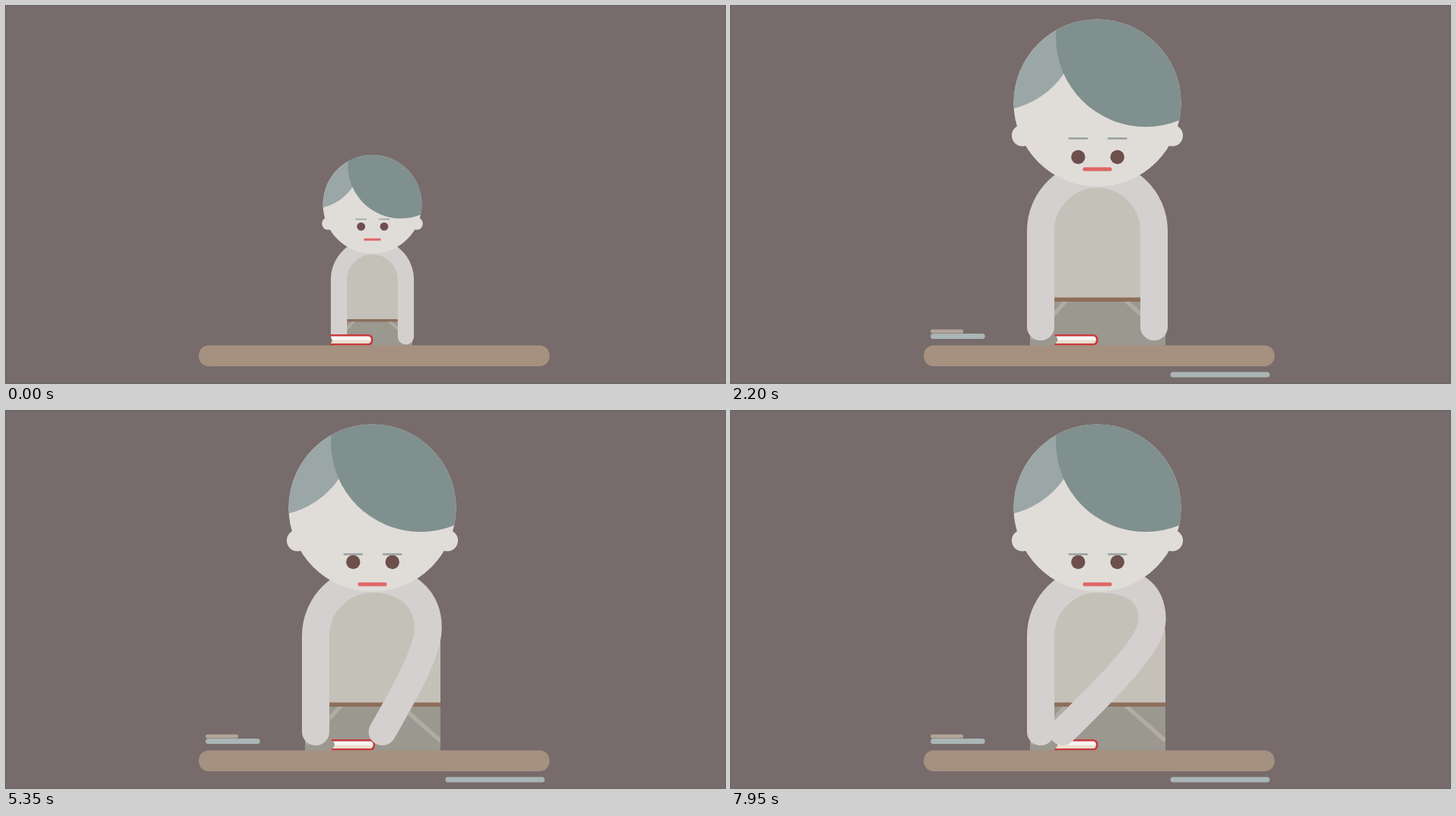
Recreate the animation shown at these times as an HTML page. Size 945 px wide and 496 px high, loop 8000 ms.

```html
<!DOCTYPE html>
<html lang="en">
<head>
<meta charset="utf-8">
<title>Pushing a book</title>
<style>
  html, body { margin: 0; width: 100%; height: 100%; overflow: hidden; background: #776b6b; }
  svg { display: block; width: 100%; height: 100%; }
  .arm { fill: none; stroke: #d4d0cf; stroke-width: 36; stroke-linecap: round; }
  .pocket { stroke: #b0aca4; stroke-width: 5.5; }
  .skin { fill: #e0ddd9; }
  .brow { fill: #97a1a0; }
</style>
</head>
<body>
<svg viewBox="0 0 945 496">
  <defs>
    <clipPath id="headClip"><circle cx="481.5" cy="127.5" r="110"/></clipPath>
    <clipPath id="bodyClip"><path d="M393 470V296A88.5 85 0 0 1 571 296V470Z"/></clipPath>
  </defs>

  <g class="figure">
    <g clip-path="url(#bodyClip)">
      <rect x="393" y="205" width="178" height="180" fill="#c4c1b8"/>
      <rect x="393" y="389" width="178" height="80" fill="#9a988f"/>
      <path class="pocket" d="M442 386L395 438M518 387L571 434"/>
      <rect x="393" y="383.5" width="178" height="5.5" fill="#8d6f5b"/>
    </g>
    <path id="leftArm" class="arm"/>
  </g>

  <g id="book">
    <path d="M426 433.5H476Q481 433.5 481 439T476 445H426Q433 439 426 433.5Z" fill="#f8f7f5"/>
    <path d="M429.3 439.5H481Q481 445 476 445H426Q429 442 429.3 439.5Z" fill="#ebe0d0"/>
    <path d="M425.5 433.2H475.5Q481.2 433.2 481.2 439.2T475.5 445.3H425.5" fill="none" stroke="#c9393d" stroke-width="2.6"/>
  </g>

  <g class="figure">
    <path id="rightArm" class="arm"/>
    <circle class="skin" cx="383" cy="170.5" r="14"/>
    <circle class="skin" cx="580" cy="170.5" r="14"/>
    <circle class="skin" cx="481.5" cy="127.5" r="110"/>
    <g clip-path="url(#headClip)">
      <circle cx="344.5" cy="25" r="113" fill="#9ba7a6"/>
      <circle cx="545" cy="41" r="118" fill="#80908e"/>
    </g>
    <g id="eyes" fill="#6d4f4c">
      <g id="rings" fill="#cbc7c4"><circle cx="456.3" r="11.5"/><circle cx="507.8" r="11.5"/></g>
      <circle cx="456.3" r="9.2"/><circle cx="507.8" r="9.2"/>
    </g>
    <g id="brows" class="brow">
      <rect x="443.5" y="-1.2" width="25.5" height="2.4" rx="1"/>
      <rect x="495" y="-1.2" width="25.5" height="2.4" rx="1"/>
    </g>
    <rect id="mouth" rx="2" fill="#e06666"/>
  </g>

  <rect x="253.3" y="446.5" width="461" height="27.5" rx="13" fill="#a69180"/>
  <rect class="bar" data-width="43" x="262.3" y="425.5" height="5" rx="2.5" fill="#b1a698"/>
  <rect class="bar" data-width="71.5" x="262.3" y="431" height="7" rx="3.5" fill="#aab5b6"/>
  <rect class="bar" data-width="130.5" x="577.5" y="481.5" height="7" rx="3.5" fill="#aab5b6"/>
</svg>
<script>
const LOOP = 8000;
const CENTER = 481.5;
const byId = id => document.getElementById(id);
const set = (el, attrs) => { for (const key in attrs) el.setAttribute(key, attrs[key]); };
const figures = document.querySelectorAll('.figure');
const bars = document.querySelectorAll('.bar');

const progress = (t, start, end) => Math.min(1, Math.max(0, (t - start) / (end - start)));
const sine = p => (1 - Math.cos(Math.PI * p)) / 2;
const mix = (a, b, p) => a + (b - a) * p;

// keys: [time, value] pairs joined by sine easing
function track(t, keys) {
  let value = keys[0][1];
  for (let i = 1; i < keys.length; i++) {
    const [start, from] = keys[i - 1], [end, to] = keys[i];
    if (t >= start) value = mix(from, to, sine(progress(t, start, end)));
  }
  return value;
}

// side: -1 left, 1 right; reach: how far the hand moves inwards
function armPath(side, reach, lift) {
  const point = (d, y) => `${(CENTER + side * d).toFixed(2)} ${(y - lift).toFixed(2)}`;
  const rise = reach > 0 ? reach * 0.18 : -reach * 0.4;
  const elbow = { d: 74.5 - Math.max(0, reach) * 0.02, y: 296 - rise };
  const hand = { d: 74.5 - reach, y: 422 };
  const bend = elbow.y + 32;
  return `M${point(0, 221)}C${point(41, 221)} ${point(elbow.d, elbow.y - 41)} ${point(elbow.d, elbow.y)}` +
    `C${point(elbow.d, bend)} ${point((elbow.d + hand.d) / 2, (bend + hand.y) / 2)} ${point(hand.d, hand.y)}`;
}

function draw(t) {
  const scale = mix(0.59, 1, sine(progress(t, 0, 1000)));
  const transform = `translate(${CENTER} 453) scale(${scale}) translate(${-CENTER} -453)`;
  figures.forEach(figure => set(figure, { transform }));

  const leftReach = track(t, [[2600, 0], [3250, -16], [3900, 63], [4400, 0]]);
  const rightReach = track(t, [[4250, 0], [4750, -16], [5430, 64], [5900, 0], [7100, 0], [8000, 121]]);
  const shrug = track(t, [[5950, 0], [6250, 1], [6550, 1], [6900, 0]]);
  set(byId('leftArm'), { d: armPath(-1, leftReach, 20 * shrug) });
  set(byId('rightArm'), { d: armPath(1, rightReach, 20 * shrug) });

  let slide = 0;
  if (t < 3900) slide = Math.max(0, leftReach - 7);
  else if (t < 5430) slide = Math.min(56, Math.max(0, 64 - rightReach));
  set(byId('book'), { transform: `translate(${slide} 0)` });

  set(byId('eyes'), { transform: `translate(0 ${mix(177, 198.7, progress(t, 950, 2150))})` });
  set(byId('brows'), { transform: `translate(0 ${mix(160.5, 188.5, progress(t, 950, 3500))})` });
  set(byId('rings'), { opacity: shrug });

  const mouthY = mix(206, 228, progress(t, 1350, 3490));
  const width = mix(38, 20, shrug), height = mix(4.8, 9, shrug);
  set(byId('mouth'), { x: CENTER - width / 2, y: mouthY - height / 2, width, height });

  bars.forEach(bar => set(bar, { width: bar.dataset.width * sine(progress(t, 500, 1200)) }));
}

const began = performance.now();
function tick() {
  draw((performance.now() - began) % LOOP);
  requestAnimationFrame(tick);
}
draw(0);
requestAnimationFrame(tick);
</script>
</body>
</html>
```
